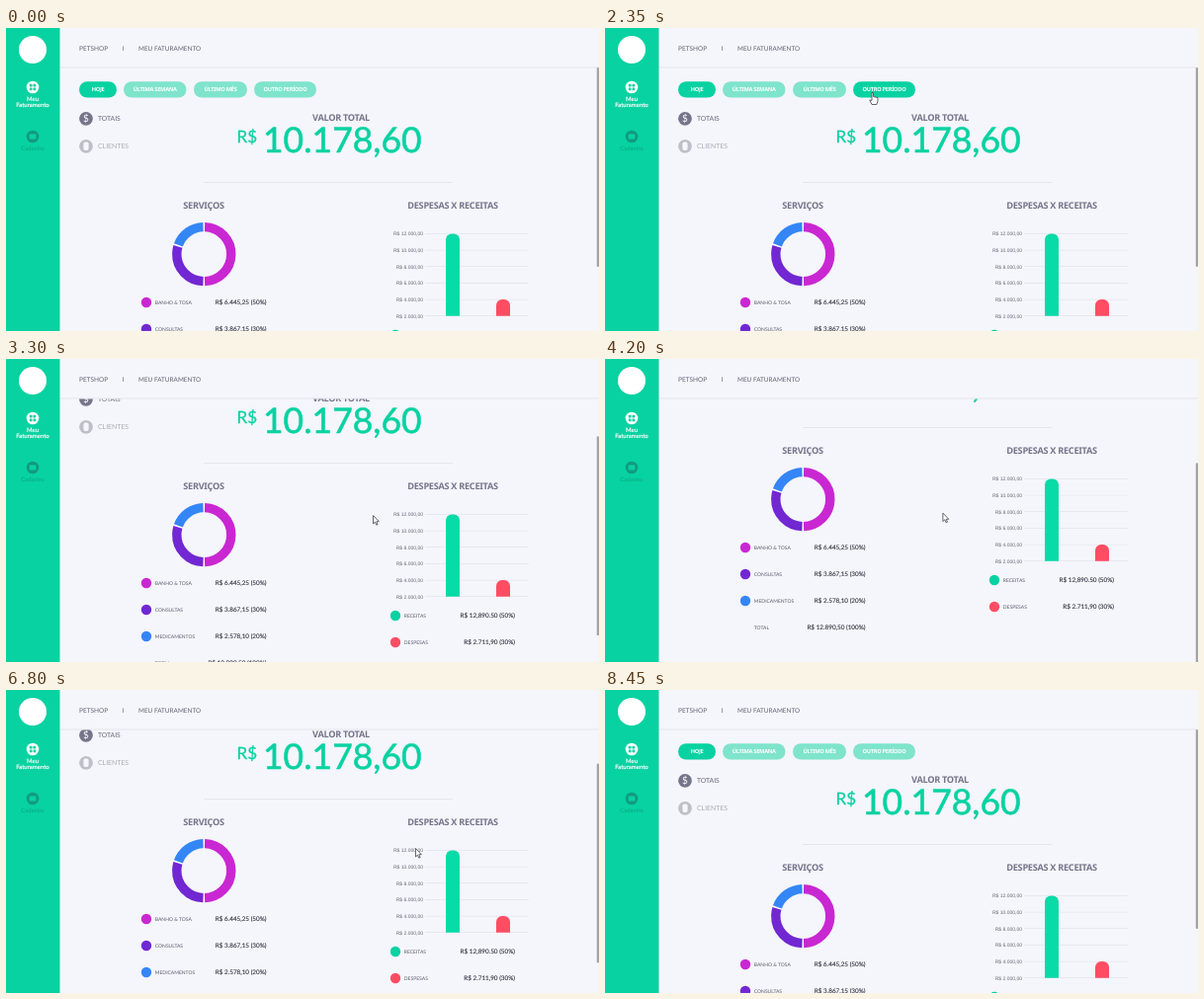
An HTML page with a canvas for the animation above (9.05 s loop, 600 by 307 pixels).

```html
<!DOCTYPE html>
<html lang="pt-BR">
<head>
<meta charset="utf-8">
<title>Meu Faturamento</title>
<style>
html, body { margin: 0; width: 100%; height: 100%; overflow: hidden; background: #f5f5fc; }
canvas { display: block; width: 600px; height: 307px; }
</style>
</head>
<body>
<canvas id="stage"></canvas>
<script>
const W = 600, H = 307, LOOP = 9050, STEP = 50, TAU = Math.PI * 2;
const canvas = document.getElementById('stage');
const ctx = canvas.getContext('2d');
const dpr = window.devicePixelRatio || 1;
canvas.width = W * dpr;
canvas.height = H * dpr;
ctx.scale(dpr, dpr);

const C = {
  page: '#f5f5fc', green: '#08d2a1', pale: '#7fe4cc', bar: '#07dba8', red: '#ff4d63',
  magenta: '#c927d2', purple: '#7127d1', blue: '#3486f7',
  slate: '#75758a', ink: '#34343f', line: '#e5e5ec'
};
const SANS = 'Lato, "Open Sans", sans-serif';
const ARIAL = '"Liberation Sans", Arial, sans-serif';
const CENTER = { align: 'center' };

// Motion
const linear = p => p;
const easeOut = p => 1 - (1 - p) ** 3;
const progress = (t, start, end) => Math.min(1, Math.max(0, (t - start) / (end - start)));

const scrollAt = t => Math.round(
  45 * progress(t, 2600, 3000) +
  42 * progress(t, 3200, 3900) -
  87 * easeOut(progress(t, 6650, 7430)));

const glide = (x, y, ease = linear) => (from, p) => ({
  x: from.x + (x - from.x) * ease(p),
  y: from.y + (y - from.y) * ease(p)
});

// Inward spiral around the donut, counterclockwise.
const spiral = (from, p) => {
  const angle = -0.72 - 4 * p, r = 30 - 12 * p;
  return { x: 200 + r * Math.cos(angle), y: 142 + r * Math.sin(angle) };
};

const moves = [
  { start: 50, end: 1000, path: glide(113, 66) },
  { start: 1050, end: 2100, path: glide(270, 65) },
  { start: 2350, end: 2700, path: glide(371, 158, easeOut) },
  { start: 3300, end: 3900, path: glide(371, 164) },
  { start: 4000, end: 5000, path: glide(223, 122) },
  { start: 5100, end: 6050, path: spiral },
  { start: 6150, end: 6500, path: glide(414, 160) },
  { start: 7850, end: 8450, path: glide(563, 312) }
];

const pointerAt = t => moves.reduce(
  (pos, { start, end, path }) => t > start ? path(pos, progress(t, start, end)) : pos,
  { x: 474, y: 312 });

// Drawing helpers
function setFont(size, weight, family, stretch = 'normal') {
  ctx.fontStretch = stretch;
  ctx.font = `${weight} ${stretch} ${size}px ${family}`;
  ctx.textRendering = 'geometricPrecision';
}

function text(str, x, y, size, color, { align = 'left', family = SANS, heavy = 0 } = {}) {
  setFont(size, 400, family);
  ctx.letterSpacing = '0px';
  ctx.textAlign = align;
  ctx.fillStyle = color;
  ctx.fillText(str, x, y);
  if (heavy) {
    ctx.strokeStyle = color;
    ctx.lineWidth = heavy;
    ctx.lineJoin = 'round';
    ctx.strokeText(str, x, y);
  }
}

// Prefer a family that has a condensed face; otherwise set headings smaller.
function findNarrow() {
  const width = (family, stretch) => {
    setFont(20, 700, family, stretch);
    return ctx.measureText('DESPESAS').width;
  };
  return ['"Open Sans"', 'Roboto', '"Noto Sans"']
    .find(family => width(family, 'condensed') < width(family, 'normal') * 0.9);
}
const narrow = findNarrow();

function heading(str, x, middle, size, color) {
  const px = size * (narrow ? 0.85 : 0.73);
  setFont(px, 600, `${narrow || '"Noto Sans"'}, sans-serif`, 'condensed');
  ctx.letterSpacing = '-0.3px';
  ctx.textAlign = 'center';
  ctx.fillStyle = color;
  ctx.fillText(str, x, middle + px * 0.357);
}

function rect(x, y, w, h, color, radius = 0) {
  ctx.fillStyle = color;
  ctx.beginPath();
  ctx.roundRect(x, y, w, h, radius);
  ctx.fill();
}

function dot(x, y, r, color) {
  ctx.fillStyle = color;
  ctx.beginPath();
  ctx.arc(x, y, r, 0, TAU);
  ctx.fill();
}

// Page parts
function drawSidebar() {
  rect(0, 0, 54.5, H, C.green);
  dot(27, 22, 14, '#fff');
  dot(27, 60, 6.3, '#fff');
  for (const dx of [-3.2, 0.5])
    for (const dy of [-3.2, 0.5]) rect(27 + dx, 60 + dy, 2.7, 2.7, C.green, 0.6);
  text('Meu', 27, 74, 6, '#fff', { align: 'center', heavy: 0.2 });
  text('Faturamento', 27, 80, 6, '#fff', { align: 'center', heavy: 0.2 });
  dot(27, 110, 6.3, '#129a80');
  rect(23.7, 107.4, 6.6, 5.2, C.green, 0.7);
  text('Cadastro', 27, 124, 6, '#0ba781', CENTER);
}

function drawHeader() {
  rect(54, 0, W - 54, 40, C.page);
  rect(54, 39.5, W - 54, 1, C.line);
  text('PETSHOP', 74, 22.6, 6.5, '#62626f');
  text('I', 118.3, 22.6, 6.5, '#62626f', CENTER);
  text('MEU FATURAMENTO', 134, 22.6, 6.4, '#62626f');
}

const buttons = [
  { label: 'HOJE', x: 74, w: 38 },
  { label: 'ÚLTIMA SEMANA', x: 119, w: 63.5 },
  { label: 'ÚLTIMO MÊS', x: 190, w: 54 },
  { label: 'OUTRO PERÍODO', x: 251, w: 63 }
];

const buttonUnder = ({ x, y }) =>
  y >= 54 && y <= 71 ? buttons.find(b => x >= b.x && x <= b.x + b.w) : undefined;

function drawSummary(hovered) {
  for (const b of buttons) {
    const active = b === buttons[0] || b === hovered;
    rect(b.x, 54.2, b.w, 16.4, active ? C.green : C.pale, 8.2);
    heading(b.label, b.x + b.w / 2, 62.4, 7.8, '#fff');
  }

  dot(81, 91.8, 6.9, C.slate);
  text('$', 81, 95.4, 10, '#fff', CENTER);
  text('TOTAIS', 93, 94.4, 6.8, '#676777');
  dot(81, 119.8, 6.9, '#bfbfc8');
  rect(78.4, 115.6, 5.2, 8.4, '#f7f7fb', 2);
  text('CLIENTES', 93, 122.4, 6.9, '#ababb5');

  heading('VALOR TOTAL', 339, 91, 12.6, C.slate);
  text('R$', 233.5, 116.2, 17, C.green, { heavy: 0.3 });
  text('10.178,60', 260, 126.4, 35.5, C.green, { heavy: 0.6 });
  rect(200, 156, 252, 1, C.line);
}

function legend(x, y, right, label, value, color) {
  if (color) dot(x, y, 5.2, color);
  text(label, x + 8.8, y + 1.6, 5, '#5b5b68');
  text(value, right, y + 2, 6.35, C.ink, { align: 'right', heavy: 0.12 });
}

function drawDonut(cx, cy, inner, outer, slices) {
  const mid = (inner + outer) / 2, gap = 1.5 / mid;
  let start = -TAU / 4;
  ctx.lineWidth = outer - inner;
  const arc = (from, to, color) => {
    ctx.beginPath();
    ctx.arc(cx, cy, mid, from, to);
    ctx.strokeStyle = color;
    ctx.stroke();
  };
  arc(0, TAU, '#fff');
  for (const [share, color] of slices) {
    const end = start + share * TAU;
    arc(start + gap / 2, end - gap / 2, color);
    start = end;
  }
}

function drawServices() {
  heading('SERVIÇOS', 200, 179.4, 12.6, C.slate);
  drawDonut(200.3, 229.1, 22.8, 32.2, [[0.5, C.magenta], [0.3, C.purple], [0.2, C.blue]]);
  [
    ['BANHO & TOSA', 'R$ 6.445,25 (50%)', C.magenta],
    ['CONSULTAS', 'R$ 3.867,15 (30%)', C.purple],
    ['MEDICAMENTOS', 'R$ 2.578,10 (20%)', C.blue],
    ['TOTAL', 'R$ 12.890,50 (100%)']
  ].forEach((row, i) => legend(142, 278 + i * 27, 263.5, ...row));
}

function drawBalance() {
  const base = 291.7, perThousand = 8.33;
  heading('DESPESAS X RECEITAS', 452, 179.4, 12.6, C.slate);
  for (let k = 2; k <= 12; k += 2) {
    const y = base - (k - 2) * perThousand;
    rect(424, y - 0.4, 105, 0.8, C.line);
    text(`R$ ${k}.000,00`, 422, y + 1.8, 5, '#666671', { align: 'right', family: ARIAL });
  }
  const bar = (x, k, color) => {
    const h = (k - 2) * perThousand;
    rect(x, base - h, 14, h, color, [6, 6, 0, 0]);
  };
  bar(445, 12, C.bar);
  bar(496, 4, C.red);
  legend(394, 311, 515, 'RECEITAS', 'R$ 12,890.50 (50%)', C.green);
  legend(394, 338, 515, 'DESPESAS', 'R$ 2.711,90 (30%)', C.red);
}

const shapes = {
  arrow: new Path2D('M.5 .5V9L2.4 7.2 3.8 10.2 5.1 9.6 3.8 6.7H6.4Z'),
  hand: new Path2D('M0 .5H1.5V4.5L6 5.6V9L4.8 12.5H0L-2.2 8 0 8.4Z')
};

function drawPointer({ x, y }, shape) {
  ctx.save();
  ctx.translate(x, y);
  ctx.lineWidth = 0.9;
  ctx.lineJoin = 'round';
  ctx.fillStyle = '#fff';
  ctx.strokeStyle = '#55555d';
  ctx.fill(shape);
  ctx.stroke(shape);
  ctx.restore();
}

function draw(t) {
  const scroll = scrollAt(t);
  const pointer = pointerAt(t);
  const hovered = scroll ? undefined : buttonUnder(pointer);

  rect(0, 0, W, H, C.page);
  ctx.save();
  ctx.translate(0, -scroll);
  drawSummary(hovered);
  drawServices();
  drawBalance();
  ctx.restore();
  drawHeader();
  drawSidebar();
  rect(597.8, 40 + scroll * 0.75, 2.2, 202, '#a2a2a6', 1);
  drawPointer(pointer, hovered ? shapes.hand : shapes.arrow);
}

function tick() {
  const t = performance.now() % LOOP;
  draw(Math.floor(t / STEP) * STEP);
  requestAnimationFrame(tick);
}
tick();
</script>
</body>
</html>
```
